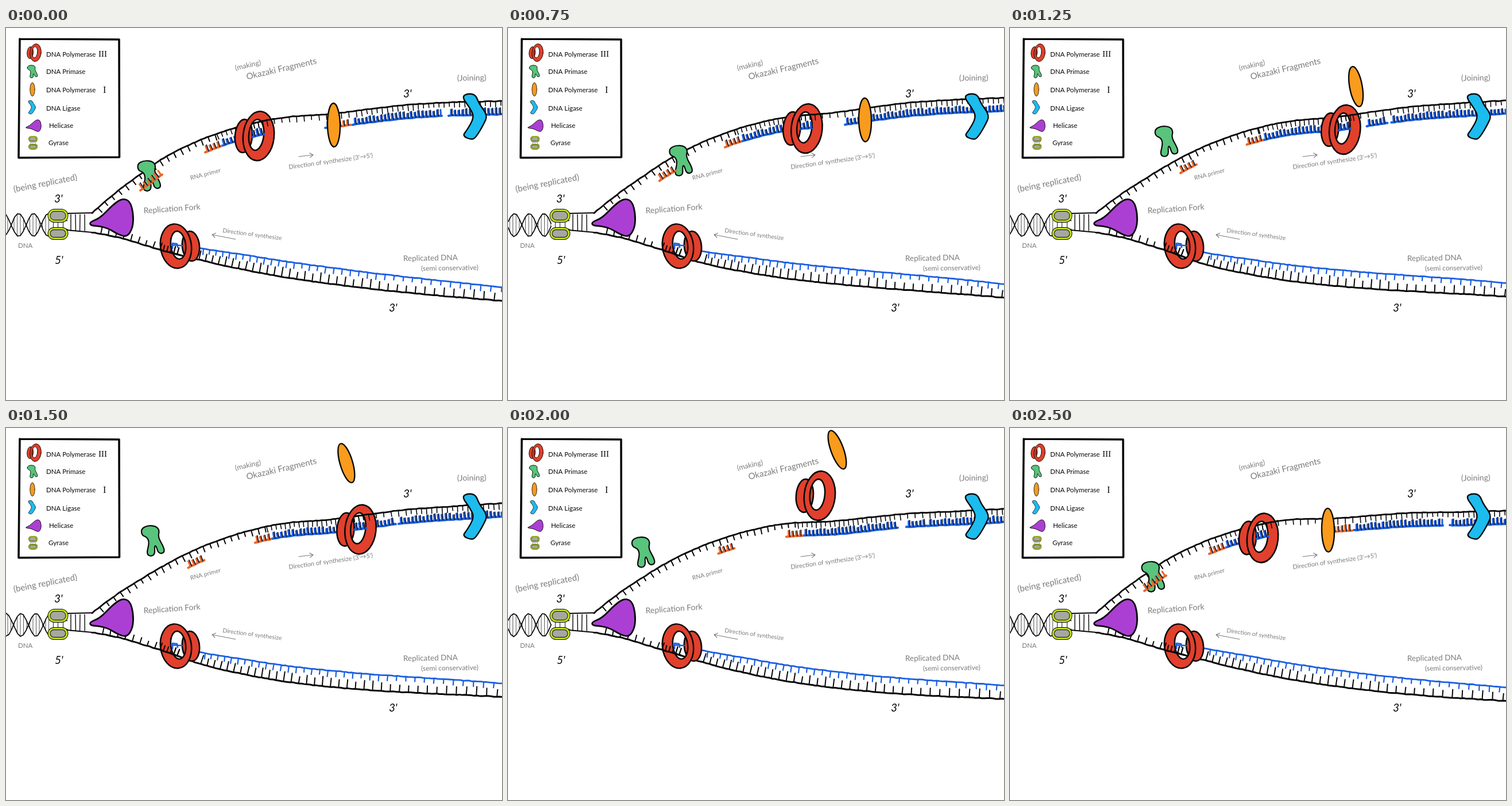
An HTML page with a canvas that plays this animation: 864x648 px, repeating every 2750 ms.

```html
<!DOCTYPE html>
<html lang="en">
<head>
<meta charset="utf-8">
<title>DNA replication</title>
<style>
html, body { margin: 0; width: 864px; height: 648px; overflow: hidden; background: #fff }
canvas { display: block }
</style>
</head>
<body>
<canvas id="stage" width="864" height="648"></canvas>
<script>
const c = document.getElementById('stage').getContext('2d');
const STEP = 250, STEPS = 11, TAU = Math.PI * 2;
const BLACK = '#080808', GREY = '#7c7c7c', BLUE = '#1c5fe0', RED = '#e1402c',
  GREEN = '#58c47c', AMBER = '#f99b1c', CYAN = '#1cbcef', PURPLE = '#ac3fd3', RNA = '#e8682c';

const mix = (a, b, u) => a + (b - a) * u;
const clamp = u => Math.max(0, Math.min(1, u));
const hop = (u, power) => Math.sin(Math.PI * u ** power);
const noise = n => { const v = Math.sin(n * 91.7) * 4375.5; return v - Math.floor(v) - .5; };

// Smooth curve y(x) through [x, y] points
function curve(points) {
  const last = points.length - 1;
  const slope = i => {
    const [ax, ay] = points[Math.max(0, i - 1)], [bx, by] = points[Math.min(last, i + 1)];
    return (by - ay) / (bx - ax);
  };
  return x => {
    let i = 0;
    while (i < last - 1 && x > points[i + 1][0]) i++;
    const [x0, y0] = points[i], [x1, y1] = points[i + 1];
    const h = x1 - x0, u = (x - x0) / h, v = 1 - u;
    return y0 * v * v * (1 + 2 * u) + y1 * u * u * (3 - 2 * u) + h * u * v * (slope(i) * v - slope(i + 1) * u);
  };
}
const topRest = curve([[150, 322], [190, 290], [230, 262], [275, 233], [330, 205], [400, 179], [480, 161],
  [570, 154], [700, 139], [864, 131]]);
const lowRest = curve([[150, 356], [200, 366], [270, 387], [340, 408], [420, 426], [500, 440], [640, 456], [864, 472]]);
const copyRest = curve([[337, 387], [420, 400], [500, 412], [640, 428], [864, 448]]);

const slopeAt = (f, x) => (f(x + 3) - f(x - 3)) / 6;

function pen(color, width) {
  c.strokeStyle = color;
  c.lineWidth = width;
  c.lineCap = c.lineJoin = 'round';
}

function line(points, color = BLACK, width = 2) {
  pen(color, width);
  c.beginPath();
  points.forEach(p => c.lineTo(...p));
  c.stroke();
}

function strand(f, from, to, color, width) {
  const points = [];
  for (let x = from; x < to; x += 5) points.push([x, f(x) + noise(x)]);
  line([...points, [to, f(to)]], color, width);
}

// Short strokes standing on a curve; a positive length points down
function ticks(f, from, to, gap, length, color, width) {
  for (let x = from, i = 1; x < to; x += gap(x), i++) {
    const m = slopeAt(f, x), l = length * (1 + .4 * noise(i)) / Math.hypot(1, m);
    line([[x, f(x)], [x - m * l + noise(i + 50), f(x) + l]], color, width);
  }
}

function fragment(f, from, to, color) {
  if (to <= from) return;
  strand(f, from, to, color, 4);
  ticks(f, from + 4, to, () => 6.5, -9, color, 3);
  ticks(f, from + 6, to, () => 6.5, -10, '#101830', 1.8);
}

function place(x, y, sx, sy, draw, tilt = 0) {
  c.save();
  c.translate(x, y);
  c.rotate(tilt * Math.PI / 180);
  c.scale(sx, sy);
  draw();
  c.restore();
}

function inside(x, y, w, h, draw) {
  c.save();
  c.beginPath();
  c.rect(x, y, w, h);
  c.clip();
  draw();
  c.restore();
}

function paint(fill, width) {
  c.fillStyle = fill;
  pen(BLACK, width);
  c.fill('evenodd');
  c.stroke();
}

function oval(x, y, rx, ry, fill, width, tilt = 0) {
  c.beginPath();
  c.ellipse(x, y, rx, ry, tilt, 0, TAU);
  paint(fill, width);
}

function blob(points, fill, width) {
  const mid = (a, b) => [(a[0] + b[0]) / 2, (a[1] + b[1]) / 2];
  c.beginPath();
  c.moveTo(...mid(points.at(-1), points[0]));
  points.forEach((p, i) => c.quadraticCurveTo(...p, ...mid(p, points[(i + 1) % points.length])));
  c.closePath();
  paint(fill, width);
}

function ring() {
  oval(-19, 0, 15, 29, RED, 2.6, .08);
  c.beginPath();
  c.ellipse(7, 0, 27, 43, .1, 0, TAU);
  c.closePath();
  c.moveTo(3 + 13 * Math.cos(.1), -2 + 13 * Math.sin(.1));
  c.ellipse(3, -2, 13, 27, .1, 0, TAU);
  paint(RED, 2.6);
}
const primase = () => blob([[-20, -21], [-9, -27], [6, -26], [12, -18], [9, -7], [20, 12], [20, 21], [10, 22],
  [6, 8], [3, 9], [4, 23], [-3, 27], [-11, 23], [-6, 4], [-9, -6], [-19, -10]], GREEN, 2.2);
const polOne = () => oval(0, 0, 11, 38, AMBER, 2.4);
const ligase = () => blob([[-22, -34], [-12, -40], [2, -38], [8, -22], [23, -2], [16, 14], [3, 36], [-5, 41],
  [-21, 34], [-13, 24], [0, 1], [-8, -15]], CYAN, 2.4);
const helicase = () => blob([[-38, 8], [-20, 1], [2, -22], [18, -33], [32, -29], [38, -6], [37, 18], [27, 34],
  [12, 30], [-6, 19], [-22, 15], [-37, 14]], PURPLE, 2.8);

function gyrase() {
  for (const y of [-7, 8]) line([[-14, y], [16, y]], BLACK, 1.6);
  for (const x of [-8, 0, 9]) line([[x, -8], [x, 8]], '#444', 1.3);
  for (const [y, h] of [[-15.5, 19], [15.5, 17]]) {
    c.beginPath();
    c.roundRect(-15.5, y - h / 2, 31, h, h / 2);
    paint('#a4a8a0', 5);
    pen('#c0dc18', 3.2);
    c.stroke();
  }
}

function text(str, x, y, size, tilt = 0, color = GREY, style = '', family = 'Lato, sans-serif') {
  place(x, y, 1, 1, () => {
    c.font = `${style} ${size}px ${family}`;
    c.fillStyle = color;
    c.fillText(str, 0, 0);
  }, tilt);
}

function legend() {
  line([[24, 19], [197, 20], [197.5, 225], [22, 226], [24, 19]], BLACK, 3.6);
  place(49, 43, .36, .36, ring);
  place(46, 76, .45, .42, primase);
  place(46, 107, .38, .31, polOne);
  place(45, 138, .32, .3, ligase);
  place(48, 170, .35, .32, helicase);
  place(47, 200, .44, .44, gyrase);
  [['DNA Polymerase', 70, 50], ['DNA Primase', 70, 80], ['DNA Polymerase', 70, 112], ['DNA Ligase', 70, 144],
    ['Helicase', 75, 174], ['Gyrase', 74, 204]].forEach(([s, x, y]) => text(s, x, y, 11.5, 0, BLACK));
  text('III', 161, 50, 15, 0, BLACK, '', '"Liberation Serif", serif');
  text('I', 169, 113, 16, 0, BLACK, '', '"Liberation Serif", serif');
}

function arrow(x0, y0, x1, y1) {
  const a = Math.atan2(y1 - y0, x1 - x0), barb = d => [x1 - 7 * Math.cos(a + d), y1 - 7 * Math.sin(a + d)];
  line([[x0, y0], [x1, y1], barb(.6), [x1, y1], barb(-.6)], GREY, 1.2);
}

function labels() {
  text('(being replicated)', 14, 286, 15, -11);
  text('DNA', 21, 383, 11.5);
  text('Replication Fork', 240, 323, 14, -4);
  text('RNA primer', 322, 265, 10.5, -15);
  text('(making)', 400, 74, 12.5, -13);
  text('Okazaki Fragments', 420, 90, 15, -13);
  text('(Joining)', 786, 92, 14, -1);
  text("Direction of synthesize (3'→5')", 493, 246, 11, -8);
  text('Direction of synthesize', 377, 356, 10.3, 7.5);
  text('Replicated DNA', 692, 406, 13.5, -1);
  text('(semi conservative)', 723, 423, 12, -1);
  arrow(510, 224, 535, 221);
  arrow(400, 368, 359, 360);
  for (const [s, x, y] of [["3'", 84, 304], ["5'", 85, 411], ["3'", 692, 121], ["3'", 667, 494]])
    text(s, x, y, 19, 0, BLACK, 'italic');
}

function helix(k) {
  const half = x => 20 * Math.cos(Math.PI * (x - 48 - 5 * k) / 26);
  for (let x = 3; x < 75; x += 5.5) line([[x, 343 - half(x)], [x, 343 + half(x)]], '#444', .9);
  for (const side of [-1, 1]) strand(x => 343 + side * half(x), 0, 75, BLACK, 1.7);
}

function fork() {
  line([[106, 323], [150, 322]]);
  line([[106, 352], [150, 356]]);
  for (const x of [113, 121, 129, 137]) line([[x, 325], [x + noise(x), 353]], BLACK, 1.4);
}

// k runs from -1, where the enzymes wait at their starting places, to 9
function draw(k) {
  const t = Math.max(0, k), phase = (k + STEPS) % STEPS;
  const flow = j => 6.2 * j + 1.38 * j * j;
  const push = j => 433 + 24 * j + .93 * j * j;

  // The strands sway with slow waves that travel away from the fork
  const top = x => topRest(x)
    + 7 * clamp((x - 150) / 125) * Math.cos(TAU * ((phase - 6) / STEPS - (x - 275) / 2100))
    + 1.4 * (phase - 5) * clamp((x - 480) / 300);
  const sway = x => 4 * clamp((x - 270) / 70) * Math.cos(TAU * (x + 120 - 90 * phase) / 1080);
  const low = x => lowRest(x) + sway(x);
  const copy = x => copyRest(x) + sway(x);
  const under = x => top(x) + 23 * Math.hypot(1, slopeAt(top, x));

  // Each enzyme rides the strand, then lifts off and hops back to its start
  const ringBack = clamp((t - 6) / 4), hopBack = clamp((t - 3) / 7);
  const ringX = mix(push(Math.min(t, 6)), push(0), ringBack ** 1.25);
  const ringY = mix(top(ringX) + 23, 184, clamp(ringBack * 4)) - 66 * hop(ringBack, 1);
  const primaseX = mix(249 + 17.3 * Math.min(t, 3), 249, hopBack) - 30 * hop(hopBack, 1.5);
  const primaseY = mix(top(249 + 17.3 * Math.min(t, 3)) + 14, 256, hopBack) - 50 * hop(hopBack, .8);
  const ovalX = mix(571 + 17 * Math.min(k, 3), 554, hopBack);
  const ovalY = mix(top(ovalX) + 20, 163, clamp(hopBack * 4)) - 132 * hop(hopBack, 1.5);

  const newFrom = 347 + flow(t), newTo = Math.min(push(t) + 17, 541 + flow(t));
  const shortFrom = 556 + flow(k), longFrom = 604 + .92 * flow(k), gapFrom = 759 + flow(k);
  const drift = phase * 5 % 9;
  const wide = x => 11 + (x - 330) * .014;

  const upper = () => {
    strand(top, 150, 870, BLACK, 2.8);
    ticks(top, 160 + drift, newFrom + 20, () => 12, 9, BLACK, 2);
    ticks(top, newFrom + 20, newTo, () => 8, 9, BLACK, 1.6);
    ticks(top, newTo + 4, 864, x => x < longFrom ? 13 : 9, 9, BLACK, 1.6);
    fragment(under, newFrom + 29, newTo, BLUE);
    fragment(under, newFrom, newFrom + 28, RNA);
  };
  const lower = () => {
    strand(low, 150, 870, BLACK, 3);
    ticks(low, 165 + drift, 262, () => 13, -10, BLACK, 2);
    ticks(low, 268, 302, () => 6, -11, BLACK, 2);
    ticks(low, 336 + drift, 864, wide, -14, BLACK, 2);
  };

  c.fillStyle = '#fff';
  c.fillRect(0, 0, 864, 648);
  labels();
  legend();
  helix(phase);
  fork();
  upper();

  // The oval enzyme turns RNA into DNA; the ligase closes the gap that reaches it
  const rnaLeft = k < 2;
  fragment(under, shortFrom, rnaLeft ? ovalX : shortFrom + 36, BLUE);
  if (rnaLeft) fragment(under, ovalX, longFrom - 3, RNA);
  const gapOpen = gapFrom < 785;
  fragment(under, longFrom, gapOpen ? gapFrom : 870, BLUE);
  if (gapOpen) fragment(under, gapFrom + 12, 870, BLUE);

  lower();
  strand(copy, 337, 870, BLUE, 2.8);
  ticks(copy, 344 + drift, 864, wide, 9, BLUE, 2.2);

  place(90.5, 342.5, 1, 1, gyrase);
  place(184, 330, 1, 1, helicase);
  place(816, 154, 1, 1, ligase);

  place(303, 380, -1, .9, ring);
  inside(268, 340, 36, 80, lower);
  line([[290, 384], [290, 375], [298, 376], [299, 382]], BLUE, 2.6);
  line([[288, 378], [307, 379]], BLUE, 2.6);

  const primerX = 234 + .96 * flow(t);
  place(primaseX, primaseY, 1, 1, primase);
  fragment(under, primerX, primerX + (rnaLeft ? 38 : 28), RNA);

  place(ringX, ringY, 1, 1, ring);
  if (!ringBack) inside(ringX - 5, ringY - 45, 39, 90, upper);

  place(ovalX, ovalY, 1, 1 - .07 * clamp(hopBack * 4), polOne, -1 - 20 * hop(hopBack, 1.5));
}

let shown;
function tick() {
  const step = Math.floor(performance.now() / STEP) % STEPS;
  if (step !== shown) {
    shown = step;
    draw((step + 1) % STEPS - 1);
  }
  requestAnimationFrame(tick);
}
tick();
</script>
</body>
</html>
```
